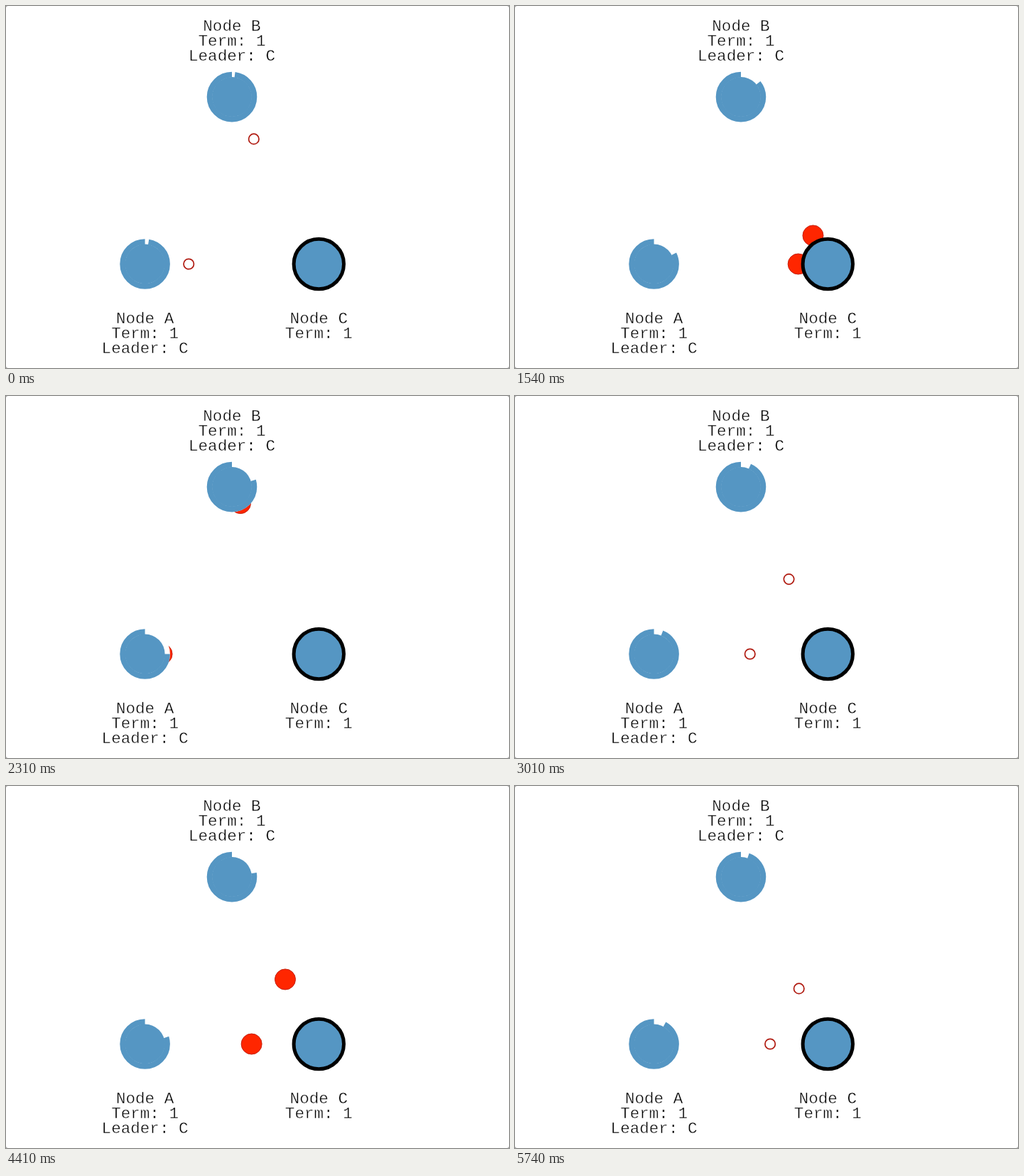
An HTML page that plays this animation: 708x510 px, repeating every 5.81 s.

```html
<!DOCTYPE html>
<html lang="en">
<head>
<meta charset="utf-8">
<title>Leader heartbeats</title>
<style>
  html, body { margin: 0; width: 100%; height: 100%; overflow: hidden; background: #999; }
  svg { display: block; width: 708px; height: 510px; background: #fff; border-radius: 3px; }
  text {
    font: 22.6px "Courier New", "Liberation Mono", monospace;
    text-anchor: middle; fill: #000; stroke: #fff; stroke-width: 0.5;
  }
  .core { fill: #5596c3; }
  .back { fill: #fff; }
  .ring { fill: none; stroke: #5596c3; stroke-width: 7.8; }
  .leader { fill: #5596c3; stroke: #000; stroke-width: 5; }
  .request { fill: #ff2600; stroke: #c4200a; stroke-width: 1; }
  .reply { fill: #fff; stroke: #b01a10; stroke-width: 1.7; }
</style>
</head>
<body>
<svg id="stage" viewBox="0 0 708 510"></svg>
<script>
const LOOP = 5810, STEP = 70, TRAVEL = 1052;
const stage = document.getElementById("stage");

const leader = { x: 440.3, y: 363.5 };

// rates: sweep speed of the timer in degrees per ms, one per round
const followers = [
  { name: "A", x: 195.6, y: 363.5, labelY: 447, rates: [0.0349, 0.0365, 0.0403] },
  { name: "B", x: 318, y: 128.1, labelY: 35, rates: [0.0283, 0.0404, 0.0274] }
];

// Times when the leader sends and when the followers answer and reset.
const rounds = [
  { send: -1330, answer: -265 },
  { send: 1361, answer: 2429 },
  { send: 4003, answer: 5037 }
];

function add(tag, attrs, content = "") {
  const el = document.createElementNS(stage.namespaceURI, tag);
  for (const key in attrs) el.setAttribute(key, attrs[key]);
  el.textContent = content;
  return stage.appendChild(el);
}

const circle = (cls, cx, cy, r) => add("circle", { class: cls, cx, cy, r });

function label(x, y, lines) {
  lines.forEach((line, i) => add("text", { x, y: y + i * 21 }, line));
}

for (const f of followers) {
  f.request = circle("request", 0, 0, 14.5);
  f.reply = circle("reply", 0, 0, 7.2);
}

for (const f of followers) {
  circle("back", f.x, f.y, 35.3);
  circle("core", f.x, f.y, 28);
  f.ring = circle("ring", f.x, f.y, 31.4);
  f.ring.setAttribute("pathLength", 360);
  f.ring.setAttribute("transform", `rotate(-90 ${f.x} ${f.y})`);
  label(f.x, f.labelY, ["Node " + f.name, "Term: 1", "Leader: C"]);
}
circle("leader", leader.x, leader.y, 35.2);
label(leader.x, 447, ["Node C", "Term: 1"]);

function place(el, from, to, p) {
  const moving = p >= 0 && p < 1;
  el.setAttribute("visibility", moving ? "visible" : "hidden");
  if (!moving) return;
  el.setAttribute("cx", from.x + (to.x - from.x) * p);
  el.setAttribute("cy", from.y + (to.y - from.y) * p);
}

function draw(t) {
  const { send } = rounds.findLast(r => r.send <= t);
  const current = rounds.findLastIndex(r => r.answer <= t);
  const elapsed = t - rounds[current].answer;
  for (const f of followers) {
    place(f.request, leader, f, (t - send) / TRAVEL);
    place(f.reply, f, leader, elapsed / TRAVEL);
    f.ring.setAttribute("stroke-dasharray", `0 ${elapsed * f.rates[current]} 360 0`);
  }
}

const began = performance.now();
function tick() {
  const t = (performance.now() - began) % LOOP;
  draw(Math.floor(t / STEP) * STEP);
  requestAnimationFrame(tick);
}
tick();
</script>
</body>
</html>
```
